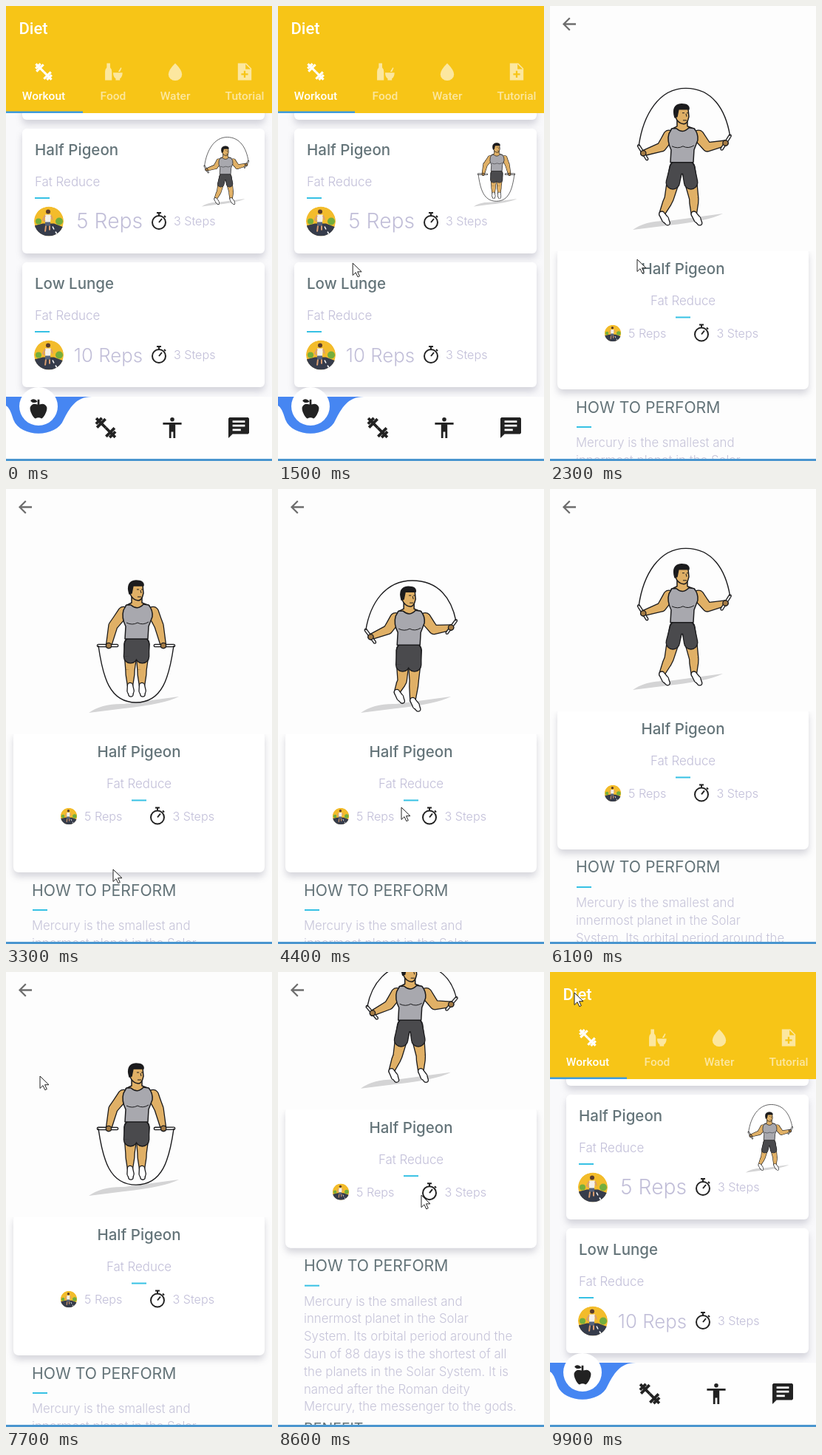
Recreate the animation shown at these times as an HTML page. Size 360 by 616 pixels, loop 10000 ms.

```html
<!DOCTYPE html>
<html lang="en">
<head>
<meta charset="utf-8">
<title>Workout app</title>
<style>
html, body { margin: 0; height: 100%; overflow: hidden; background: #fdfdfd; }
svg { display: block; width: 360px; height: 616px; font-family: Inter, "Open Sans", sans-serif; }
.bar { font-family: Roboto, sans-serif; font-weight: 500; }
.card { fill: #fff; filter: drop-shadow(0 6px 5px rgba(60, 60, 90, .2)); }
.line { fill: none; stroke: currentColor; }
.blob { stroke: #1b1b1d; stroke-width: 2.6; stroke-linejoin: round; paint-order: stroke; }
</style>
</head>
<body>
<svg id="stage" viewBox="0 0 360 616"></svg>
<script>
const LOOP = 10000, JUMP = 3800 / 3;
const LAVENDER = '#c1bed8', SLATE = '#647479', CYAN = '#36c1e4', DARK = '#222';
const SKIN = '#e0b066', SHORTS = '#4a4a4d', INK = '#1b1b1d';

// Icons are centred on 0,0 in a 24 unit box
const half = '<path class="line" stroke-width="2.7" d="M0 0H13M6.2-5.8V5.8M9.3-4V4"/>';
const icons = {
  dumbbell: `<g transform="rotate(45)">${half}<g transform="scale(-1 1)">${half}</g></g>`,
  food: '<path d="M-7.5-10h4v5q2 2 2 5V10h-8V0q0-3 2-5zM0 1H11q0 5-3 7v2H3V8Q0 6 0 1zM6 0l3-5 1 .6L8 0z"/>',
  drop: '<path d="M0-10q8 8 8 13a8 7.5 0 0 1-16 0q0-5 8-13z"/>',
  note: '<path fill-rule="evenodd" d="M-8-10H2L8-4V10H-8zM1-9V-3H7zM-4 2V4H-1V7H1V4H4V2H1V-1H-1V2z"/>',
  person: '<circle cy="-8" r="2"/><path d="M-9-5H9V-3H3V10H1V4H-1V10H-3V-3H-9z"/>',
  chat: '<path fill-rule="evenodd" d="M-9-10H9l1 1V5L9 6H-6l-4 4V-9zM-6-7v2H6v-2zM-6-3v2H6v-2zM-6 1v2H2V1z"/>',
  apple: '<path d="M8-2C10 1 5 10 3 10Q0 8-3 10C-5 10-10 1-8-2Q-6-6-1-4V-7C-6-4-8-8-8-8S-5-12-1-7V-9H1V-4Q6-6 8-2Z"/>',
  back: '<path class="line" stroke-width="2" d="M8 0H-7M.7-7.3L-6.6 0L.7 7.3"/>'
};

const text = (x, y, size, fill, s, extra = '') =>
  `<text x="${x}" y="${y}" font-size="${size}" fill="${fill}" ${extra}>${s}</text>`;
const rect = (x, y, w, h, fill) => `<rect x="${x}" y="${y}" width="${w}" height="${h}" fill="${fill}"/>`;
const icon = (name, x, y, scale, color) =>
  `<g transform="translate(${x} ${y}) scale(${scale})" color="${color}" fill="${color}">${icons[name]}</g>`;
const use = (id, x, y, scale = 1) => `<use href="#${id}" transform="translate(${x} ${y}) scale(${scale})"/>`;
const middle = 'text-anchor="middle" ', thin = 'font-weight="300" ', medium = 'font-weight="500" ';

const defs = `<defs>
  <g id="man"></g>
  <clipPath id="disc"><circle r="20"/></clipPath>
  <g id="runner" clip-path="url(#disc)">
    <circle r="20" fill="#f3bc2b"/>
    <path d="M-20 6L-8 3H7L20 8V20H-20z" fill="#363c4b"/>
    <path d="M5 7l2 4M9 14l3 5" stroke="#fff" stroke-width="1.5"/>
    <circle cx="-14" cy="0" r="4" fill="#75ae3c"/><circle cx="14" cy="0" r="5" fill="#75ae3c"/>
    <circle cx="-1" cy="-13" r="3" fill="#5b3d2c"/>
    <path d="M-5-9H3L2 2H-5z" fill="#f4f1ea"/>
    <path d="M-5 1H2V6H-5z" fill="#56627a"/>
    <path d="M-5-8l-3 6 3 2M3-8l2 6M-4 6l-1 8M1 6v6" stroke="#d99d70" stroke-width="2" fill="none"/>
  </g>
  <g id="watch" color="${DARK}" class="line" stroke-width="2">
    <circle r="9"/><path d="M-3-13H3M0-13v4M7-9l2 2M0 0l4-5"/>
  </g>
</defs>`;

const card = (y, title, reps, size) => `
  <rect class="card" x="22" y="${y}" width="328" height="169" rx="6"/>
  ${text(39, y + 36, 20.5, SLATE, title, medium)}
  ${text(39, y + 78, 16.9, LAVENDER, 'Fat Reduce', thin)}
  ${rect(39, y + 93, 20, 2, CYAN)}
  ${use('runner', 58, y + 125.5)}
  ${text(185, y + 135, size, LAVENDER, reps, thin + 'text-anchor="end"')}
  ${use('watch', 207, y + 127)}
  ${text(227, y + 131, 16.1, LAVENDER, '3 Steps', thin)}`;

const tab = (x, name, label, fill) =>
  icon(name, x, 89, 1.15, fill) + text(x, 127, 15.5, fill, label, middle + 'class="bar"');

const faded = '#fce79f';
const listPage = `
  ${rect(0, 0, 360, 616, '#f9f9fb')}
  ${card(-15, '', '', 20)}
  ${card(166, 'Half Pigeon', '5 Reps', 28.2)}
  ${card(347, 'Low Lunge', '10 Reps', 25.8)}
  ${use('man', 211, 126, .48)}
  ${rect(0, 0, 360, 145, '#f7c517')}
  ${text(17.5, 38, 22, '#fff', 'Diet', 'class="bar"')}
  ${tab(51, 'dumbbell', 'Workout', '#fff')}
  ${tab(145, 'food', 'Food', faded)}
  ${tab(229, 'drop', 'Water', faded)}
  ${tab(323, 'note', 'Tutorial', faded)}
  ${rect(0, 142.5, 104, 2.5, '#3d9bdd')}
  ${rect(0, 529, 360, 87, '#fefefe')}
  <path d="M0 529H116C94 529 86 545 78 560C68 585 20 585 10 560Q5 543 0 541Z" fill="#4686f2"/>
  <circle cx="44" cy="542" r="26" fill="#fff"/>
  ${icon('apple', 44, 545, 1.35, DARK)}
  ${['dumbbell', 'person', 'chat'].map((name, i) => icon(name, 135 + 90 * i, 571, 1.4, DARK)).join('')}`;

const lines = [
  'Mercury is the smallest and', 'innermost planet in the Solar',
  'System. Its orbital period around the', 'Sun of 88 days is the shortest of all',
  'the planets in the Solar System. It is', 'named after the Roman deity',
  'Mercury, the messenger to the gods.'
];
const section = (y, title, size) => `
  ${text(35, y, size, SLATE, title)}
  ${rect(36, y + 18.5, 20, 2, CYAN)}
  ${lines.map((s, i) => text(35, y + 46.5 + i * 23.8, 16.8, '#c6c4d9', s, thin)).join('')}`;

const detailPage = `
  ${rect(0, -70, 360, 760, '#fdfdfd')}
  <g id="scroll">
    <rect class="card" x="10" y="328" width="340" height="191" rx="7"/>
    ${rect(0, 60, 360, 272, '#fdfdfd')}
    ${use('man', 0, 0)}
    ${text(180, 363, 20.5, SLATE, 'Half Pigeon', middle + medium)}
    ${text(180, 405, 16.9, LAVENDER, 'Fat Reduce', middle + thin)}
    ${rect(170, 420.5, 20, 2, CYAN)}
    ${use('runner', 85, 443, .56)}
    ${text(106, 449, 16.2, LAVENDER, '5 Reps', thin)}
    ${use('watch', 205, 444.5)}
    ${text(225.5, 449, 16.1, LAVENDER, '3 Steps', thin)}
    ${section(550.5, 'HOW TO PERFORM', 21.2)}
    ${section(770.5, 'BENEFIT', 19.5)}
  </g>
  ${icon('back', 26, 24.5, 1.13, '#6d6d6d')}`;

stage.innerHTML = `${defs}<g>${listPage}</g><g id="detail">${detailPage}</g>
  ${rect(0, 613, 360, 3, '#4a96cf')}
  <path id="pointer" d="M0 0V16.5l4-3.8 2.8 6 2.5-1.1-2.8-5.9h5.5z" fill="#fff" stroke="${DARK}"/>`;
const [man, detail, scroller, pointer] =
  ['man', 'detail', 'scroll', 'pointer'].map(id => document.getElementById(id));

const mix = (a, b, f) => a + (b - a) * f;
const mixPoint = (a, b, f) => a.map((v, i) => mix(v, b[i], f));
const smooth = f => f * f * (3 - 2 * f);
const ease = (t, from, to) => smooth(Math.min(1, Math.max(0, (t - from) / (to - from))));
// Swings 0 to 1 and back once per cycle, resting at both ends
const swing = cycle => smooth(smooth((1 - Math.cos(2 * Math.PI * cycle)) / 2));

// Outlined limb through joints [[x, y], width]
function blob(fill, ...joints) {
  const d = joints.map(([[x, y], w], i) => {
    const r = w / 2;
    const joint = `M${x - r} ${y}a${r} ${r} 0 1 0 ${w} 0a${r} ${r} 0 1 0 ${-w} 0z`;
    if (!i) return joint;
    const [[px, py], pw] = joints[i - 1];
    const len = Math.hypot(x - px, y - py) || 1;
    const nx = (py - y) / len / 2, ny = (x - px) / len / 2;
    return joint + `M${px + nx * pw} ${py + ny * pw}L${x + nx * w} ${y + ny * w}
      L${x - nx * w} ${y - ny * w}L${px - nx * pw} ${py - ny * pw}z`;
  }).join('');
  return `<path class="blob" fill="${fill}" d="${d}"/>`;
}

function drawMan(phase) {
  const lift = swing(2 * phase), ground = 1 - lift;
  const cross = swing(phase) * ground, spread = (1 - swing(phase)) * ground;
  const cx = 178 - 2 * Math.max(lift, cross), cy = 147 - 9 * lift;

  const side = s => {
    const shoulder = [cx + 3 + s * 20, cy + 29];
    const elbow = [cx + s * 31 + 4 * ground, 191 - 6 * lift];
    const hand = [cx + s * (37 + 19 * ground) + 4 * ground, 192 - 7 * s * ground + 20 * lift];
    const tip = [hand[0] + s * (14 - 8 * ground), hand[1] - 10 * ground];
    const hip = [cx + 1 + s * 8, cy + 72];
    const knee = [cx + s * (8 + 9 * spread), 261 - 16 * lift];
    const ankle = [cx + s * (8 + 14 * spread + 3 * cross) - 5 * ground, 282 - 16 * lift + 6 * s * cross];
    const toe = [ankle[0] + 1 + 7 * ground, ankle[1] + 12];
    const thigh = mixPoint(hip, knee, .48), calf = mixPoint(knee, ankle, .3);
    return {
      hip, thigh, tip,
      arm: blob(SKIN, [shoulder, 14], [mixPoint(shoulder, elbow, .6), 12], [elbow, 11], [hand, 6]) +
        blob('#eee', [tip, 2], [mixPoint(tip, hand, 1.8), 2]) + blob('#a47b45', [hand, 6]),
      leg: blob(SKIN, [hip, 17], [thigh, 15], [knee, 11], [calf, 10.5], [ankle, 6]) +
        blob('#fff', [ankle, 6], [mixPoint(ankle, toe, .6), 8], [toe, 5])
    };
  };
  const left = side(-1), right = side(1);
  const [lx, ly] = left.tip, [rx, ry] = right.tip;
  const ropeX = cx + 6 * ground, ropeY = mix(107.5, 289, lift);

  man.innerHTML = `
    <path d="M112 303Q130 290 160 291L234 281Q215 291 160 297Z" fill="#d4d4d5"/>
    ${left.leg}${right.leg}${left.arm}${right.arm}
    ${blob(SHORTS, [left.thigh, 17], [left.hip, 16], [right.hip, 16], [right.thigh, 17])}
    <g transform="translate(${cx} ${cy})" stroke="${INK}" stroke-width="1.5" stroke-linejoin="round">
      <path d="M-6 7V16L-14 20Q2 30 18 20L8 16V8z" fill="${SKIN}"/>
      <path d="M-13 19L-7 19Q2 27 10 18L17 19Q23 26 22 35L17 48L16 65H-15L-14 48Q-20 36-17 26Z" fill="#a8a8ae"/>
      <path d="M-13 43Q-5 47 2 43Q9 47 17 42" fill="none" stroke-width="1"/>
      <path d="M-8-8H9L10 3Q8 13 3 13Q-5 12-8 4Z" fill="${SKIN}"/>
      <path d="M-9 4Q-14-13 0-14Q11-14 10-7L-4-7L-6 3Z" fill="${INK}"/>
      <path d="M1-2h3M7-2h2M6-1l1 4M2 8h5" fill="none" stroke-width="1"/>
    </g>
    <path fill="none" stroke="${INK}" stroke-width="1.4" d="M${lx} ${ly}
      C${lx + 6} ${mix(ly, ropeY, .55)} ${ropeX - 36} ${ropeY} ${ropeX} ${ropeY}
      S${rx - 6} ${mix(ry, ropeY, .55)} ${rx} ${ry}"/>`;
}

// Pointer moves: start, end, x, y
const moves = [
  [300, 600, 62, 360], [800, 1900, 118, 343], [2400, 3200, 145, 515], [3500, 4400, 167, 431],
  [4500, 5050, 202, 60], [5500, 6050, 190, 640], [6700, 7300, 22, 17], [7400, 7700, 46, 141],
  [7800, 8200, 185, 450], [8200, 8700, 195, 285], [8900, 9500, 33, 28]
];

function draw(now) {
  const t = Math.floor(now % LOOP / 100) * 100;
  const shown = ease(t, 1800, 2100) - ease(t, 9600, 9900);
  const offset = 370 * (ease(t, 4400, 5200) - ease(t, 5500, 6230)) + 157 * ease(t, 8100, 8700);
  const spot = moves.reduce((p, [from, to, ...next]) => mixPoint(p, next, ease(t, from, to)), [-20, 560]);
  detail.setAttribute('opacity', shown);
  detail.setAttribute('transform', `translate(0 ${60 * (1 - shown)})`);
  scroller.setAttribute('transform', `translate(0 ${-offset})`);
  pointer.setAttribute('transform', `translate(${spot})`);
  drawMan((t + LOOP - 2300) / JUMP - (t < 2000 ? 0 : LOOP / JUMP) - .07);
  requestAnimationFrame(draw);
}
requestAnimationFrame(draw);
</script>
</body>
</html>
```
